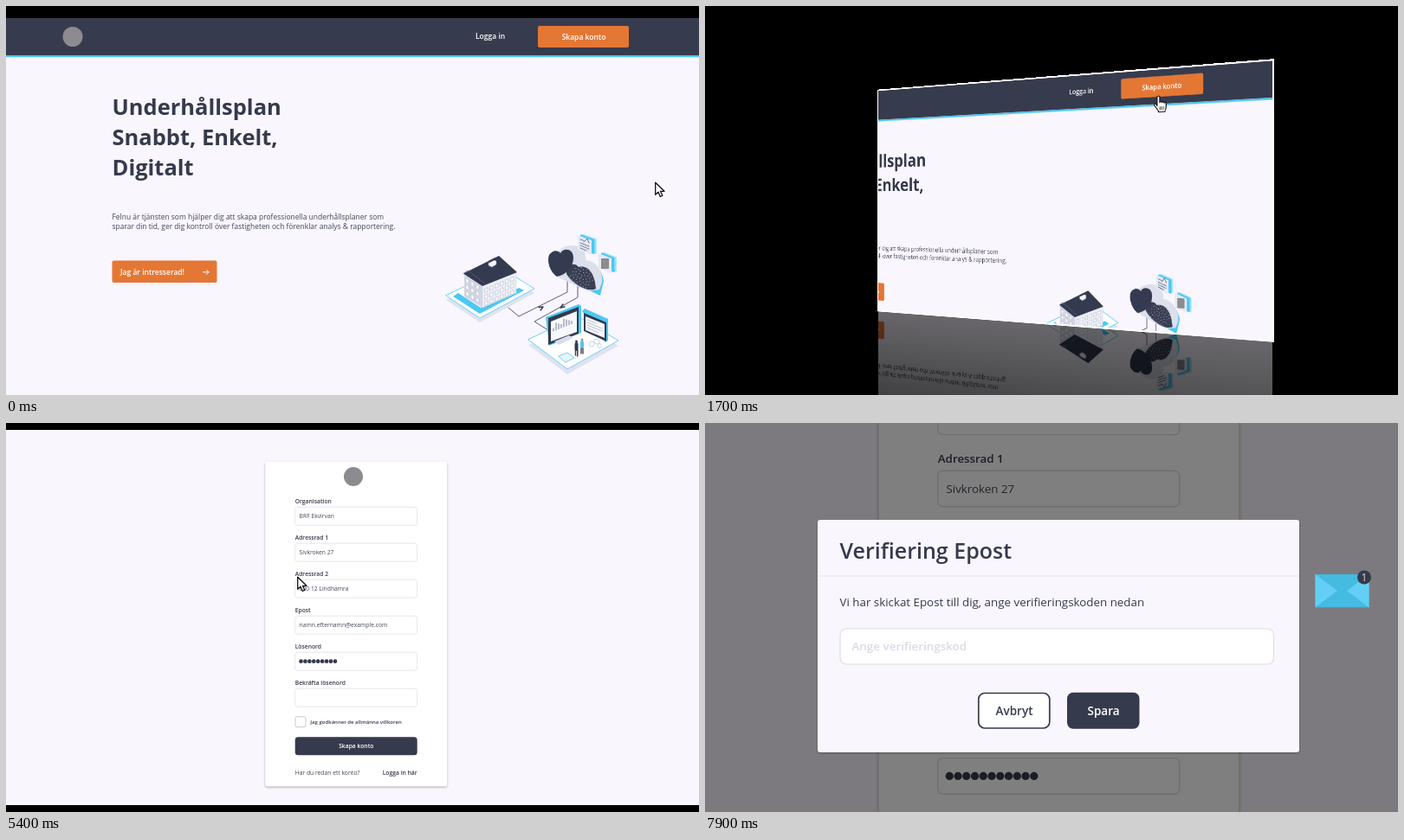
These frames come from a looping animation (800x450 px, 8000 ms). An HTML page:

```html
<!DOCTYPE html>
<html lang="sv">
<head>
<meta charset="utf-8">
<title>Skapa konto</title>
<style>
html, body { margin: 0; width: 100%; height: 100%; overflow: hidden; background: #000; }
#stage { position: relative; width: 800px; height: 450px; overflow: hidden; background: #000; perspective: 960px; }
.face { position: absolute; inset: 0; box-shadow: 0 0 0 3px #fff; background: #000; }
svg { position: absolute; left: 0; top: 0; width: 800px; height: 450px; overflow: hidden; }
.mirror { top: 453px; transform: scaleY(-1);
  -webkit-mask-image: linear-gradient(to top, rgba(0,0,0,.42), transparent);
  mask-image: linear-gradient(to top, rgba(0,0,0,.42), transparent); }
text { font-family: "Open Sans", "Noto Sans", sans-serif; white-space: pre; }
.lift { filter: drop-shadow(0 1px 1px rgba(0,0,0,.32)); }
</style>
</head>
<body>
<div id="stage"></div>
<script>
const INK = '#363a4d', PAPER = '#f9f6fe', CYAN = '#4cc8f2', ORANGE = '#e57735';
const LOOP = 8000;

// Markup helpers
const text = (x, y, size, str, weight = 400, fill = INK, extra = '') =>
  `<text x="${x}" y="${y}" font-size="${size}" font-weight="${weight}" fill="${fill}" ${extra}>${str}</text>`;
const rect = (x, y, w, h, fill, r = 0, extra = '') =>
  `<rect x="${x}" y="${y}" width="${w}" height="${h}" rx="${r}" fill="${fill}" ${extra}/>`;
const path = (d, fill = 'none', stroke = 'none', w = 1) =>
  `<path d="${d}" fill="${fill}" stroke="${stroke}" stroke-width="${w}" stroke-linejoin="round" stroke-linecap="round"/>`;
const dot = (x, y, r, fill) => `<circle cx="${x}" cy="${y}" r="${r}" fill="${fill}"/>`;
const MID = 'text-anchor="middle"';

const pointer = id => `<g id="${id}">
  <g class="arrow">${path('M.7.7V14.8L4 11.7 6.3 17 8.8 15.9 6.5 10.8H11Z', '#fff', '#111', 1.3)}</g>
  <g class="hand" transform="translate(-6.2 0)">
    ${path('M4.6 12V1.8a1.6 1.6 0 0 1 3.2 0V8a1.5 1.5 0 0 1 2.9.3 1.5 1.5 0 0 1 2.8.6 1.4 1.4 0 0 1 2.5 1V14c0 2-1 3-1.4 5.5H6.5C5.5 16 2.5 13.5 1 11.3c-.8-1.3 1-2.6 2.2-1.5Z', '#fff', '#111', 1.2)}
    ${path('M8.2 13v4M10.4 13v4M12.6 13v4', 'none', '#111', .8)}
  </g></g>`;

// A grid of slanted windows on an isometric wall
function windows(x, y, cols, rows, dx, slope) {
  let d = '';
  for (let c = 0; c < cols; c++) for (let r = 0; r < rows; r++) {
    const px = x + c * dx, py = y + c * dx * slope + r * 7.6;
    d += `M${px} ${py}l3 ${3 * slope}v4.4l-3 ${-3 * slope}Z`;
  }
  return path(d, '#fafbfd', '#b9bed0', .6);
}

function house() {
  return path('M508 340 547 366 610 332 573 309Z', '#dfe3ef')
    + path('M508 335 547 361 610 327 573 304Z', '#fff', CYAN, .8)
    + path('M516 336 547 356 598 329 592 326 548 349 522 332Z', CYAN)
    + path('M529 309 550 323V349L529 336Z', '#d3d7e4')
    + path('M550 323 589 308V332L550 349Z', '#eceef5', '#c9cddb', .5)
    + windows(531, 315, 3, 3, 6, .6) + windows(553, 327, 6, 3, 6, -.42)
    + path('M528 309.5 569 289 590 308 550 324Z', '#343a4f')
    + path('M528 309.5 533 306 553 321', 'none', '#596078', .7)
    + path('M557 300V295L561 293 566 295V299L561 302Z', '#f4f5f9', '#8c92a6', .5)
    + path('M557 295 565 291V293.5L557 297.5Z', '#343a4f');
}

// A tilted card with translucent slabs behind it
function card(x, y, w, h) {
  const slab = (dx, fill) => path(`M${x + dx} ${y - dx / 4}l${w} 6v${h}l${-w} -6Z`, fill);
  return slab(6, '#b5e8fa') + slab(4.5, '#7ed7f5') + slab(3, CYAN) + slab(0, '#e6eaf4');
}

function cloud() {
  let specks = '';
  for (let i = 0; i < 46; i++) {
    const a = i * 2.4, r = Math.sqrt(i / 46);
    specks += `M${(664 + 14 * r * Math.cos(a)).toFixed(1)} ${(314 + 13 * r * Math.sin(a)).toFixed(1)}h.1`;
  }
  return path('M636 312 686 335 690 318C688 300 670 292 655 300Z', CYAN)
    + path('M634 312C624 300 634 279 651 277 664 276 671 286 669 294 682 295 690 308 688 320L685 328 672 330Z', '#dbe0ec')
    + path('M647 310C646 300 656 295 661 302 672 299 680 310 681 327 672 332 654 322 647 310Z', '#3a3f54')
    + path(specks, 'none', '#c5cbe0', .9)
    + path('M640 286C644 279 655 281 655 291 655 303 646 311 636 313 628 308 624 295 627 288 631 282 637 282 640 286Z', '#343a4f')
    + card(660, 265, 16, 17)
    + path('M663 270 667 271.5M663 274 673 278M663 277 673 281M663 280 670 283M667 273 671 269 673 274', 'none', '#596078', .8)
    + card(684, 286, 15, 17) + rect(687, 292, 9, 12, '#8b8b90');
}

function office() {
  let bars = '';
  for (let i = 0; i < 8; i++) bars += `M${632 + i * 3} ${376 - i * 1.2}v${-3 - (i * 5 % 7)}`;
  return path('M603 392 648 426 707 393 660 366Z', '#dfe3ef')
    + path('M603 386 648 420 707 387 660 359Z', '#fff', CYAN, .8)
    + path('M623 360 661 345 664 347V378L627 393Z', CYAN)
    + path('M626 361 661 348V379L626 392Z', '#343a4f')
    + path('M629 365 659 353V377L629 388Z', '#f7f8fc')
    + path(bars, 'none', '#6d7389', .9)
    + path('M665 353 668 350 695 362V387L692 389Z', CYAN)
    + path('M667 355 693 366V388L667 376Z', '#343a4f')
    + path('M669 359 691 368V384L669 375Z', '#f7f8fc')
    + path('M671 363 681 367M671 366 688 373M671 369 688 376M671 372 684 378', 'none', '#b4bacb', .9)
    + path('M633 388 650 381 655 384 638 392Z', '#d8ddea') + path('M638 405 648 401 656 407 646 412Z', '#e7f4fb', CYAN, .8)
    + `<g fill="none" stroke="#cfd4e2"><circle cx="676" cy="391" r="3"/><circle cx="682" cy="388" r="3"/><circle cx="685" cy="393" r="2.5"/></g>`
    + dot(658.5, 388, 1.5, '#343a4f') + path('M658.5 391V397', 'none', '#343a4f', 4) + path('M657.5 398V404M659.8 398V405', 'none', '#343a4f', 1.4)
    + dot(665, 386, 1.5, '#c98763') + path('M665 389V394', 'none', CYAN, 4) + path('M664 396V402M666 396V402', 'none', '#343a4f', 1.3);
}

const home = rect(0, 0, 810, 14, '#000') + rect(0, 14, 810, 440, PAPER) + rect(0, 14, 810, 43, '#373b4e')
  + rect(0, 57, 810, 2.2, CYAN) + dot(77, 35.5, 11.5, '#8b8b90')
  + text(542, 38.4, 8.5, 'Logga in', 600, '#fff')
  + rect(614, 23, 105, 25, ORANGE, 2) + text(667, 38.8, 8.5, 'Skapa konto', 600, '#fff', MID)
  + ['Underhållsplan', 'Snabbt, Enkelt,', 'Digitalt'].map((s, i) => text(122.5, 126 + 34.8 * i, 25.5, s, 700)).join('')
  + text(122.5, 246.6, 8.46, 'Felnu är tjänsten som hjälper dig att skapa professionella underhållsplaner som', 400, '#444858')
  + text(122.5, 258, 8.46, 'sparar din tid, ger dig kontroll över fastigheten och förenklar analys &amp; rapportering.', 400, '#444858')
  + rect(122.5, 294.5, 121, 25.5, ORANGE, 2) + text(132, 310.7, 8.5, 'Jag är intresserad!', 600, '#fff')
  + path('M227.5 307.8H234M231.5 305.3 234 307.8 231.5 310.3', 'none', '#fff', 1)
  + path('M580 349 592 359 648 331V316M660 316V337L610 365 626 375', 'none', '#4a4f63', .9)
  + path('M615 348.5 620 348 617 352M645 348 640 349 643 345', 'none', '#343a4f', 1.3)
  + house() + cloud() + office() + pointer('homePointer');

// label, value, typing start and end; no value means a password
const fields = [
  ['Organisation', 'BRF Ekvirvan', 2800, 3400],
  ['Adressrad 1', 'Sivkroken 27', 3650, 3950],
  ['Adressrad 2', '000 12 Lindhamra', 3980, 4250],
  ['Epost', 'namn.efternamn@example.com', 4250, 4650],
  ['Lösenord', '', 4900, 5520],
  ['Bekräfta lösenord', '', 5520, 5720],
];
const DOTS = 11, PITCH = 4.93;

const fieldRow = ([label, value], i) => {
  const y = 97.2 + 42 * i;
  return text(333.7, y - 4.6, 6.75, label, 600) + rect(333.7, y, 141, 21, '#fff', 3, 'stroke="#dedce6" stroke-width=".7"')
    + (value ? text(338.6, y + 13, 6.75, '', 400, '#444858', `id="field${i}"`)
      : `<line id="field${i}" x1="340.5" y1="${y + 10.5}" y2="${y + 10.5}" stroke="${INK}" stroke-width="4.7" stroke-linecap="round" stroke-dasharray="0 ${PITCH}"/>`);
};

const modal = rect(130, 112, 556, 269, PAPER, 3, 'class="lift"')
  + text(155.5, 157.3, 25, 'Verifiering Epost', 600) + rect(130, 176.5, 556, 1, '#e6e3ec')
  + text(155.5, 211.7, 13.35, 'Vi har skickat Epost till dig, ange verifieringskoden nedan')
  + rect(156, 238, 500.5, 41, '#fff', 7, 'stroke="#dedce8" stroke-width="1.2"')
  + text(169.5, 263.2, 13.4, 'Ange verifieringskod', 600, '#dcd9e6')
  + rect(315.8, 312.5, 82, 40.5, '#fff', 7, `stroke="${INK}" stroke-width="1.7"`) + text(357, 337.6, 13.5, 'Avbryt', 600, INK, MID)
  + rect(418, 311.7, 83.5, 42, INK, 7) + text(460, 337.6, 13.5, 'Spara', 600, '#fff', MID);

const form = rect(-50, -50, 900, 550, '#000') + rect(-50, 8, 900, 434, PAPER)
  + rect(299.3, 44.5, 210, 376, '#fff', 2, 'class="lift"') + dot(401, 62, 11, '#8b8b90')
  + fields.map(fieldRow).join('')
  + rect(334, 339.7, 12, 12, '#fff', 2, 'stroke="#b9b8c4" stroke-width=".8"')
  + `<g id="tick">${rect(333.6, 339.3, 12.4, 12.4, INK, 1.5)}${path('M336.8 345.6 339 347.9 343 343.2', 'none', '#fff', 1.1)}</g>`
  + text(351.3, 348, 6, 'Jag godkänner de allmänna villkoren', 600)
  + rect(333.7, 363.2, 141, 21, INK, 3.5) + text(404.3, 376.2, 6.75, 'Skapa konto', 600, '#fff', MID)
  + text(333.7, 406.6, 6.75, 'Har du redan ett konto?', 400, '#444858') + text(474.7, 406.6, 6.75, 'Logga in här', 600, INK, 'text-anchor="end"')
  + pointer('formPointer')
  + rect(-50, -50, 900, 550, '#000', 0, 'id="shade"') + `<g id="modal">${modal}</g>`;

const mail = rect(704.5, 175, 62, 38.3, '#45bbe2')
  + path('M704.5 175 730 194 704.5 213.3ZM766.5 175 741 194 766.5 213.3Z', '#63cff4')
  + dot(761, 178.5, 8, '#343a4c') + text(761, 183, 12, '1', 400, '#d8d8de', MID);

const face = (id, art) => `<div class="face" id="${id}Face"><svg><g id="${id}">${art}</g></svg>
  <svg class="mirror"><use href="#${id}"/></svg></div>`;
const stage = document.getElementById('stage');
stage.innerHTML = face('home', home) + face('form', form) + `<svg><g id="mail">${mail}</g></svg>`;

// Motion
const $ = id => document.getElementById(id);
const clamp = x => Math.min(1, Math.max(0, x));
const ease = x => x < .5 ? 4 * x ** 3 : 1 - 4 * (1 - x) ** 3;
const span = (t, a, b) => clamp((t - a) / (b - a));

// Eased value at t from keys [time, ...values]
function track(t, keys) {
  const n = keys.findIndex(k => k[0] > t);
  if (n <= 0) return keys[n ? keys.length - 1 : 0].slice(1);
  const a = keys[n - 1], b = keys[n], p = ease(span(t, a[0], b[0]));
  return a.slice(1).map((v, i) => v + (b[i + 1] - v) * p);
}
const zoom = (el, s, x = 400, y = 225) => el.setAttribute('transform', `translate(${x} ${y}) scale(${s}) translate(${-x} ${-y})`);
const show = (el, on) => { el.style.display = on ? '' : 'none'; };

function point(id, [x, y], hand) {
  const el = $(id);
  el.setAttribute('transform', `translate(${x} ${y})`);
  show(el.querySelector('.arrow'), !hand);
  show(el.querySelector('.hand'), hand);
}

function flip(t) {
  const turn = 90 * (1 - Math.cos(Math.PI * span(t, 1514, 2247)));
  const depth = 1297 * Math.abs(Math.sin(turn * Math.PI / 180)) ** 1.08;
  const back = turn >= 90, angle = back ? 180 - turn : -turn;
  show($('homeFace'), !back);
  show($('formFace'), back);
  $(back ? 'formFace' : 'homeFace').style.transform =
    Math.abs(angle) < .01 ? 'none' : `translateZ(${-depth}px) rotateY(${angle}deg)`;
}

function draw(t) {
  flip(t);
  zoom($('home'), track(t, [[0, 1], [1020, 1.41]])[0], 801, 51);
  point('homePointer', track(t, [[0, 749, 203.5], [1000, 663, 47]]), t >= 850);

  zoom($('form'), track(t, [[2150, .98], [2700, 1], [6100, 1], [6850, 1.113], [7000, 1.113], [7750, 1.979]])[0]);
  point('formPointer', track(t, [[2130, 670, 38], [2750, 352, 108], [3150, 352, 108], [3500, 336, 177.5],
    [6100, 336, 177.5], [6420, 340, 346], [6520, 340, 346], [6880, 421.6, 383.5]]), t < 2250 || t >= 6380);
  show($('formPointer'), t < 7100);
  show($('tick'), t >= 6480);

  fields.forEach(([, value, from, to], i) => {
    const el = $('field' + i), p = span(t, from, to);
    if (value) el.textContent = value.slice(0, Math.round(p * value.length));
    else {
      const n = Math.round(p * DOTS);
      el.setAttribute('x2', 340.5 + (n - 1) * PITCH + .1);
      show(el, n > 0);
    }
  });

  const pop = ease(span(t, 7100, 7400));
  $('shade').setAttribute('opacity', .5 * pop);
  $('modal').setAttribute('opacity', pop);
  $('modal').setAttribute('transform', `translate(400 ${225 - 30 * (1 - pop)}) scale(${1 / 1.979}) translate(-400 -225)`);
  const letter = ease(span(t, 7500, 7800));
  show($('mail'), letter > 0);
  zoom($('mail'), letter, 735, 194);
}

const start = performance.now();
function tick() {
  draw((performance.now() - start) % LOOP);
  requestAnimationFrame(tick);
}
tick();
</script>
</body>
</html>
```
